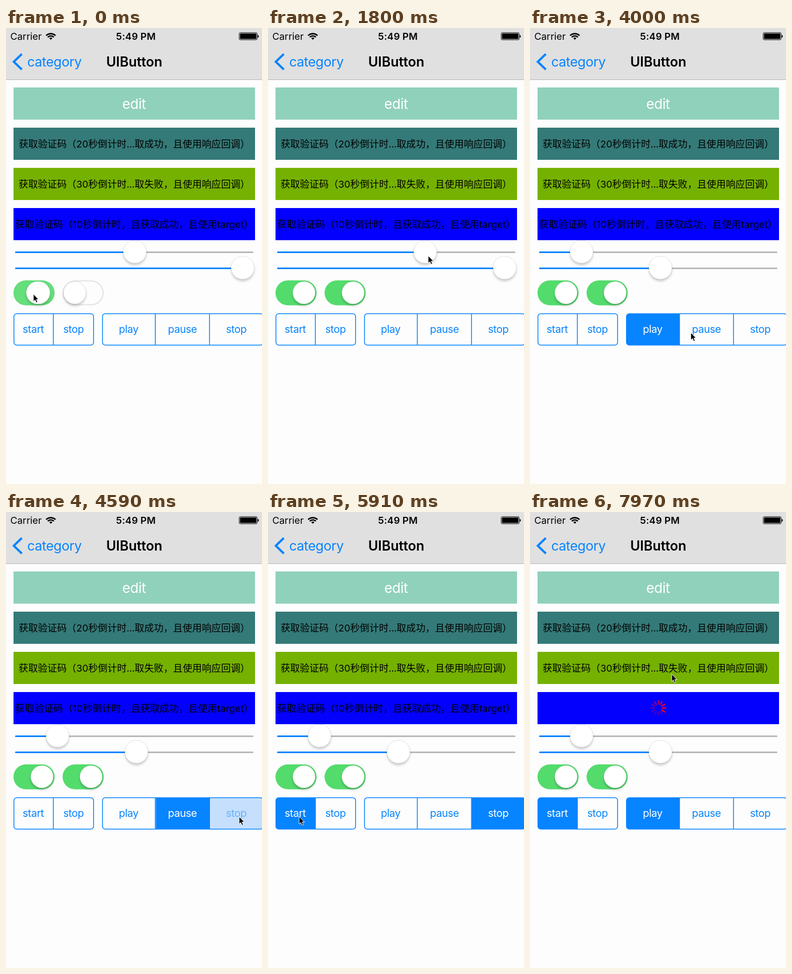
An HTML page for the animation above (8000 ms loop, 477x851 px).

```html
<!DOCTYPE html>
<html lang="zh-CN">
<head>
<meta charset="utf-8">
<style>
  html, body { margin: 0; width: 100%; height: 100%; overflow: hidden; background: #fdfdfd; }
  svg { display: block; width: 100%; height: 100%; }
  text, .latin { font: 17.9px Inter, sans-serif; }
  .cjk { font-family: "Noto Sans CJK SC", "Noto Sans CJK", sans-serif; }
  .mid { text-anchor: middle; }
  .bar { font-size: 25px; letter-spacing: -.02em; }
  .title { font-size: 25px; letter-spacing: -.002em; }
  .edit { font-size: 26px; letter-spacing: -.02em; }
  .seg { font-size: 19.4px; letter-spacing: -.02em; }
  .bold { font-weight: 600; }
</style>
</head>
<body>
<svg viewBox="0 0 477 851">
  <defs>
    <filter id="shadow" x="-30%" y="-30%" width="160%" height="170%">
      <feDropShadow dx="0" dy="3.5" stdDeviation="2.2" flood-opacity=".2"/>
    </filter>
  </defs>

  <rect width="477" height="96" fill="#e0e0e0"/>
  <rect y="96" width="477" height="1" fill="#b4b4b4"/>
  <text x="8" y="22">Carrier</text>
  <path d="M74.8 14.2A12.3 12.3 0 0 1 92.2 14.2M77.8 17.2A8 8 0 0 1 89.2 17.2" fill="none" stroke="#000" stroke-width="2.6"/>
  <path d="M83.5 22L80.6 19.1A4.1 4.1 0 0 1 86.4 19.1Z"/>
  <text class="mid bold" x="242" y="22" letter-spacing=".01em">5:49 PM</text>
  <rect x="434.5" y="8.8" width="33.5" height="13.2" rx="2" fill="none" stroke="#000"/>
  <rect x="436" y="10.3" width="30.5" height="10.2" rx="1"/>
  <path d="M469 13Q471 13 471 15.5T469 18Z"/>
  <path d="M29.5 48.5L14.5 63L29.5 77.5" fill="none" stroke="#0784ff" stroke-width="4"/>
  <text class="bar" x="39.5" y="72" fill="#0784ff">category</text>
  <text class="title bold mid" x="239" y="72">UIButton</text>
  <g id="rows"></g>
  <text class="edit mid" x="238.5" y="151" fill="#fff">edit</text>
  <g id="live"></g>
</svg>
<script>
const LOOP = 8000, STEP = 147.5, PRESS = 145;
const BLUE = '#0784ff', GREEN = '#53dc6c';

const rect = (x, y, w, h, attrs) =>
  `<rect x="${x}" y="${y}" width="${w}" height="${h}" ${attrs}/>`;

const caption = (y, text) => `<text class="cjk mid" x="239" y="${y}">` +
  text.replace(/[a-z0-9]+/g, '<tspan class="latin">$&</tspan>') + '</text>';

const pair = { x: 14, cell: 75, labels: ['start', 'stop'] };
const triple = { x: 179, cell: 100.3, labels: ['play', 'pause', 'stop'] };

// What the pointer does: it stays at a point from one time to another and glides between.
const stay = (from, to, x, y) => ({ from, to, x, y });
const click = (from, group, index) => ({
  ...stay(from, from + PRESS, group.x + (index + .5) * group.cell + 4, 568), group, index
});
const GRAB_A = 1180, DROP_A = 2000, GRAB_B = 2950, DROP_B = 3250;
const LOADING_AT = 7225;
const actions = [
  stay(0, 0, 50.5, 496),
  stay(440, 600, 136, 494),
  stay(885, 885, 243.5, 438.5),
  stay(1033, GRAB_A, 245, 424),
  stay(1475, 1625, 422, 424),
  stay(DROP_A, 2065, 101, 425),
  stay(2655, 2655, 337.5, 461.5),
  stay(2900, GRAB_B, 446, 451),
  stay(DROP_B, 3393, 248, 456),
  click(3650, triple, 0),
  click(4080, triple, 1),
  click(4570, triple, 2),
  click(5305, pair, 1),
  click(5750, pair, 0),
  click(6340, triple, 0),
  stay(6638, 6638, 254.5, 570.5),
  stay(6933, 6933, 262, 317),
  stay(LOADING_AT - PRESS, LOADING_AT + PRESS, 262, 350),
  stay(7965, LOOP, 263.5, 302)
];

const clamp = (v, lo, hi) => Math.min(hi, Math.max(lo, v));
const ramp = (t, start, end) => clamp((t - start) / (end - start), 0, 1);

function pointerAt(t) {
  const b = actions.find(action => action.to >= t);
  const a = actions[actions.indexOf(b) - 1] ?? b;
  const p = a === b ? 1 : ramp(t, a.to, b.from);
  return { x: a.x + (b.x - a.x) * p, y: a.y + (b.y - a.y) * p };
}

const knob = (x, y, w, h) => rect(x, y, w, h,
  `rx="${h / 2}" fill="#fff" stroke="#000" stroke-opacity=".13" stroke-width=".8" filter="url(#shadow)"`);

// The thumb follows the pointer between grab and drop.
function slider(t, y, grab, drop) {
  const x = pointerAt(clamp(t, grab, drop)).x - 5;
  return rect(17, y - 1.5, 444, 3, 'rx="1.5" fill="#b9b9b9"') +
    rect(17, y - 1.5, x - 17, 3, `rx="1.5" fill="${BLUE}"`) +
    knob(x - 21.5, y - 22.5, 43, 43);
}

function toggle(x, on) {
  const w = 42 + 4 * Math.sin(Math.PI * on);
  return rect(x + 1, 472, 74.5, 44.5, 'rx="22.2" fill="#fdfdfd" stroke="#e3e3e3" stroke-width="2"') +
    rect(x, 471, 76.5, 46.5, `rx="23.2" fill="${GREEN}" opacity="${Math.sqrt(on)}"`) +
    knob(x + 1.5 + on * (72.5 - w), 473, w, 42);
}

function segments(t, group) {
  const { x, cell, labels } = group;
  const clicks = actions.filter(action => action.group === group);
  const selected = clicks.findLast(c => c.to <= t)?.index;
  const pressed = clicks.find(c => c.from <= t && t < c.to)?.index;
  const width = cell * labels.length;
  const frame = attrs => rect(x + .75, 533.25, width - 1.5, 58.5, `rx="5.2" ${attrs}`);
  let out = `<clipPath id="clip${x}">${frame('')}</clipPath>`;
  labels.forEach((label, i) => {
    const left = x + i * cell;
    const [fill, ink] = i === selected ? [BLUE, '#fff']
      : i === pressed ? ['#c5dffd', '#69b2fb'] : ['none', BLUE];
    out += rect(left, 533, cell, 60, `fill="${fill}" clip-path="url(#clip${x})"`);
    if (i) out += rect(Math.round(left) - 1.5, 533, 1.5, 59, `fill="${BLUE}"`);
    out += `<text class="seg mid" x="${left + cell / 2 - .7}" y="569" fill="${ink}">${label}</text>`;
  });
  return out + frame(`fill="none" stroke="${BLUE}" stroke-width="1.5"`);
}

function spinner(t) {
  const head = Math.floor((t - LOADING_AT) * 12 / 1000) + 8;
  let out = '';
  for (let age = 0; age < 12; age++) {
    out += rect(-1.4, -15, 2.8, 8.5, `rx="1.4" fill="#f5002a" opacity="${Math.max(.27, 1 - age * .09)}"
      transform="translate(239 366) rotate(${(head - age) * 30})"`);
  }
  return out;
}

const arrow = ({ x, y }) => `<path transform="translate(${x} ${y})" stroke="#fff"
  d="M.5 .5V14.5L3.7 11.6L5.9 16.6L8.4 15.5L6.2 10.7H10.5Z"/>`;

const rows = document.getElementById('rows');
const live = document.getElementById('live');

rows.innerHTML = ['#90d1bb', '#347a78', '#75b100', '#0300fe']
  .map((color, i) => rect(14, 111 + 75 * i, 450, 60, `fill="${color}"`)).join('') +
  caption(223, '获取验证码（20秒倒计时...取成功，且使用响应回调）') +
  caption(298, '获取验证码（30秒倒计时...取失败，且使用响应回调）');

function draw(t) {
  live.innerHTML =
    (t < LOADING_AT ? caption(373, '获取验证码（10秒倒计时，且获取成功，且使用target）') : spinner(t)) +
    slider(t, 418.5, GRAB_A, DROP_A) +
    slider(t, 448.5, GRAB_B, DROP_B) +
    toggle(14, ramp(t, -300, 80)) +
    toggle(105.5, ramp(t, 440, 735)) +
    segments(t, pair) +
    segments(t, triple) +
    arrow(pointerAt(t));
}

// The screen updates in even steps, so redraw only when the step changes.
let shown = -1;
function tick() {
  const step = Math.floor(performance.now() % LOOP / STEP);
  if (step !== shown) draw((shown = step) * STEP);
  requestAnimationFrame(tick);
}
tick();
</script>
</body>
</html>
```
